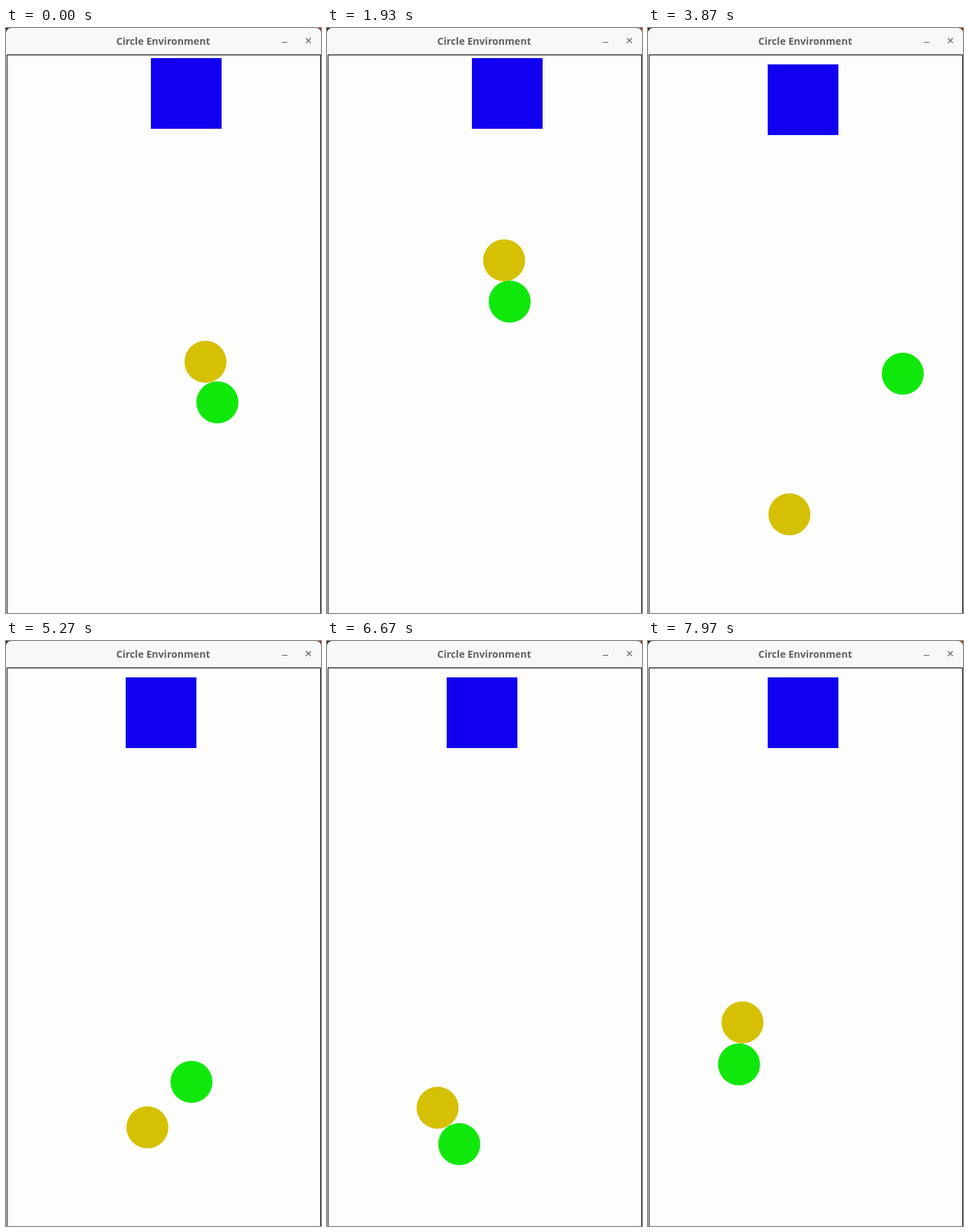
Recreate the animation shown at these times as an HTML page. Size 450x836 px, loop 8 s.

```html
<!DOCTYPE html>
<html lang="en">
<head>
<meta charset="utf-8">
<title>Circle Environment</title>
<style>
  html, body { margin: 0; width: 100%; height: 100%; overflow: hidden; }
  svg { display: block; width: 100%; height: 100%; }
  text { font: bold 14.1px "Open Sans", "Noto Sans", sans-serif; fill: #606060; }
</style>
</head>
<body>
<svg viewBox="0 0 450 836">
  <rect width="450" height="836" fill="#fdfdfc"/>
  <rect width="20" height="20" fill="#25230f"/>
  <rect x="430" width="20" height="20" fill="#8a3c1e"/>
  <path d="M0 38V8Q0 0 8 0H442Q450 0 450 8V38Z" fill="#f7f8fa"/>
  <path d="M0 37.5H450" stroke="#dcdcda"/>
  <path d="M1.5 836V38.5H449.5V836" fill="none" stroke="#000"/>
  <text x="224.5" y="24" text-anchor="middle">Circle Environment</text>
  <path d="M394 20.5H402M428.5 14.5L435.5 21.5M435.5 14.5L428.5 21.5" fill="none" stroke="#606060" stroke-width="1.2"/>
  <rect id="goal" width="101" height="101" fill="#1000ef"/>
  <circle id="ball" r="30" fill="#d6c004"/>
  <circle id="agent" r="30" fill="#10e80b"/>
</svg>
<script>
const LOOP = 8000, STEP = 100 / 3, RESET = 112;

// Way points are [step, x, y]; bodies move at constant speed between them.
const episodes = [
  {
    goal: [207, 43],
    ball: [[0, 285, 477], [58, 253, 332], [111, 234, 179]],
    agent: [[0, 302, 535], [58, 261, 391], [111, 246, 238]]
  },
  {
    goal: [171, 52],
    ball: [[181, 202, 695], [200, 158, 667], [225, 122, 588], [239, 135, 545]],
    agent: [[RESET, 370, 481], [125, 351, 522], [158, 265, 630], [175, 264, 688],
            [190, 231, 732], [200, 189, 719], [225, 139, 651], [239, 130, 605]]
  }
];

const $ = id => document.getElementById(id);
const goal = $("goal"), ball = $("ball"), agent = $("agent");

function setAttrs(el, attrs) {
  for (const name in attrs) el.setAttribute(name, attrs[name]);
}

function place(el, path, step) {
  const next = path.findIndex(p => p[0] >= step);
  const b = path[next], a = path[Math.max(0, next - 1)];
  const u = a === b ? 0 : (step - a[0]) / (b[0] - a[0]);
  const mix = axis => Math.round(a[axis] + (b[axis] - a[axis]) * u);
  setAttrs(el, { cx: mix(1), cy: mix(2) });
}

function draw(ms) {
  // Steps are shown on a 10 ms clock.
  const step = Math.floor((Math.floor(ms / 10) * 10 + 3.4) / STEP);
  const ep = episodes[step < RESET ? 0 : 1];
  setAttrs(goal, { x: ep.goal[0], y: ep.goal[1] });
  place(ball, ep.ball, step);
  place(agent, ep.agent, step);
}

const begin = performance.now();
function loop() {
  draw((performance.now() - begin) % LOOP);
  requestAnimationFrame(loop);
}
loop();
</script>
</body>
</html>
```
